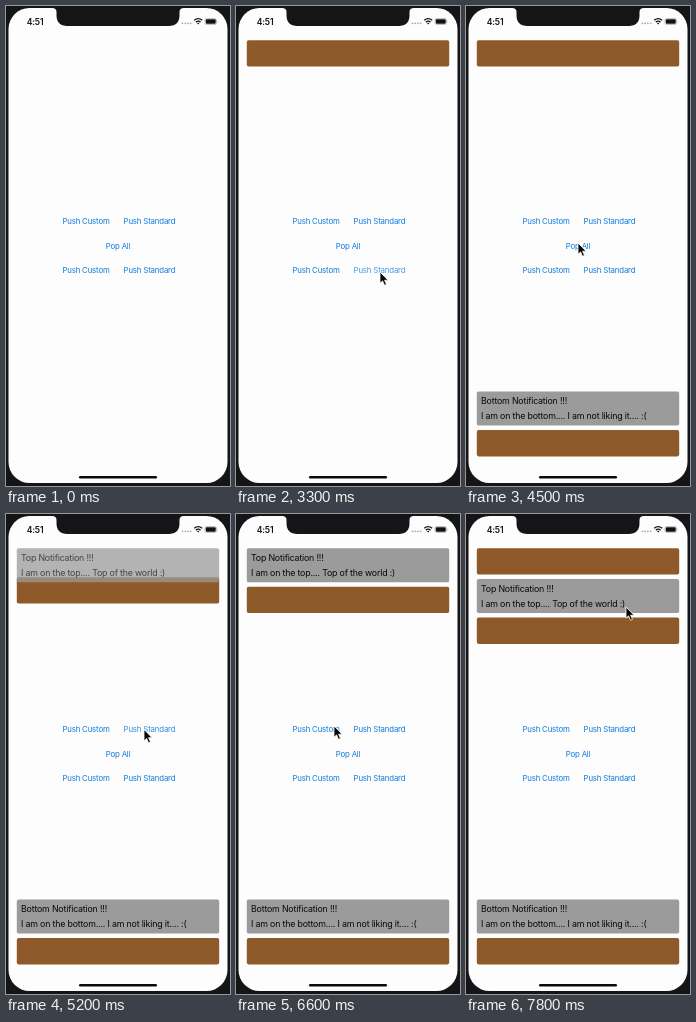
An HTML page for the animation above (8000 ms loop, 224 px wide and 480 px high).

```html
<!DOCTYPE html>
<html lang="en">
<head>
<meta charset="utf-8">
<title>Stacked notifications</title>
<style>
html, body { margin: 0; width: 100%; height: 100%; overflow: hidden; background: #151417; }
svg { display: block; width: 224px; height: 480px; }
text { font-family: Inter, "Liberation Sans", sans-serif; letter-spacing: -.02em; }
.link { font-size: 7.8px; fill: #0c7bdc; text-anchor: middle; }
.note { font-size: 8.8px; fill: #080808; }
</style>
</head>
<body>
<svg viewBox="0 0 224 480">
  <rect width="224" height="480" fill="#151417"/>
  <rect x="2.5" y="2" width="219" height="475" rx="21" fill="#fefdfe"/>
  <path d="M46 1V2Q50.500 2 50.500 6V9Q50.500 20 61.500 20H162.500Q173.500 20 173.500 9V6Q173.500 2 178 2V1Z" fill="#151417"/>
  <text x="20.700" y="18.500" font-size="8.600" font-weight="600" fill="#111">4:51</text>
  <g fill="#aaa">
    <circle cx="176.500" cy="17.300" r=".9"/><circle cx="179.200" cy="17.300" r=".9"/>
    <circle cx="181.900" cy="17.300" r=".9"/><circle cx="184.600" cy="17.300" r=".9"/>
  </g>
  <g fill="none" stroke="#111" stroke-width="1.400">
    <path d="M188.200 14.300Q192.200 11 196.200 14.300"/>
    <path d="M189.900 16.100Q192.200 14.200 194.500 16.100"/>
  </g>
  <path d="M191 17.200Q192.200 16.400 193.400 17.200L192.200 18.500Z" fill="#111"/>
  <rect x="199" y="12.500" width="11.500" height="6" rx="1.700" fill="none" stroke="#999" stroke-width=".6"/>
  <rect x="199.800" y="13.300" width="9.900" height="4.400" rx="1" fill="#111"/>
  <path d="M211.300 14.500Q212.400 15.500 211.300 16.500Z" fill="#999"/>
  <rect x="73" y="470" width="78" height="2.600" rx="1.300" fill="#0b0b0b"/>
  <g id="links"></g>
  <g id="notes"></g>
  <path id="cursor" d="M0 0V11.200L2.600 8.900L4.500 13.300L6.500 12.400L4.600 8.200H8.100Z" fill="#050505" stroke="#fff" stroke-width=".8" stroke-linejoin="round"/>
</svg>
<script>
const LOOP = 8000, STEP = 100, GAP = 4.5, TOP = 34.3, BOTTOM = 450.4, SLIDE = 400;
const $ = id => document.getElementById(id);
const clamp = v => Math.max(0, Math.min(1, v));
const ease = v => v * v * (3 - 2 * v);

function add(parent, tag, attrs, text) {
  const el = document.createElementNS("http://www.w3.org/2000/svg", tag);
  for (const k in attrs) el.setAttribute(k, attrs[k]);
  if (text) el.textContent = text;
  return parent.appendChild(el);
}

// label, centre x, baseline, [press, release] times
const links = [
  ["Push Custom", 80, 218.3, [[1600, 1720], [6730, 6850]]],
  ["Push Standard", 143.5, 218.3, [[4820, 4930]]],
  ["Pop All", 112, 242.7, []],
  ["Push Custom", 80, 267.2, [[3930, 4030]]],
  ["Push Standard", 143.5, 267.2, [[3275, 3400]]]
].map(([label, x, y, taps]) => ({
  taps, el: add($("links"), "text", { class: "link", x, y }, label)
}));

function makeNote(side, start, lines) {
  const h = lines ? 34 : 26.3;
  const el = add($("notes"), "g", {});
  add(el, "rect", { x: 10.8, width: 202.4, height: h, rx: 1.8, fill: lines ? "#9b9b9b" : "#8e5a29" });
  (lines || []).forEach((s, i) => add(el, "text", { class: "note", x: 15, y: 12.8 + 15 * i }, s));
  return { side, start, h, el };
}

const notes = [
  makeNote("top", 1700),
  makeNote("bottom", 3350, ["Bottom Notification !!!", "I am on the bottom.... I am not liking it.... :("]),
  makeNote("bottom", 4000),
  makeNote("top", 4930, ["Top Notification !!!", "I am on the top.... Top of the world :)"]),
  makeNote("top", 6850)
];

// time, x, y
const path = [
  [200, 217, 419], [500, 166, 319], [800, 104, 236], [1000, 91, 218], [1200, 90, 216.3],
  [2450, 90, 216.3], [2900, 124, 247], [3200, 144, 266], [3500, 144, 266], [3800, 86, 264],
  [4200, 86, 264], [4500, 112, 237], [4800, 138, 215.5], [5800, 138, 215.5],
  [6200, 116, 213], [6600, 98, 212], [7200, 98, 212], [7500, 132, 155], [7800, 160, 93]
];

function cursorAt(t) {
  const i = path.findIndex(p => p[0] > t);
  if (i < 0) return path[path.length - 1].slice(1);
  const [a, x, y] = path[i - 1], [b, u, v] = path[i];
  const k = (t - a) / (b - a);
  return [x + (u - x) * k, y + (v - y) * k];
}

function linkAlpha(taps, t) {
  return taps.reduce((alpha, [down, up]) => {
    const dim = clamp((t - down) / 80) * (1 - clamp((t - up) / 330));
    return Math.min(alpha, 1 - .78 * dim);
  }, 1);
}

function draw(t) {
  for (const l of links) l.el.setAttribute("opacity", linkAlpha(l.taps, t));

  // newest notes sit at the edge and push older ones inward
  const offset = { top: 0, bottom: 0 };
  for (const n of [...notes].reverse()) {
    const k = ease(clamp((t - n.start) / SLIDE));
    const y = n.side === "top" ? TOP + offset.top : BOTTOM - offset.bottom - n.h;
    n.el.setAttribute("transform", `translate(0 ${y})`);
    n.el.setAttribute("opacity", k);
    offset[n.side] += (n.h + GAP) * k;
  }

  const shown = t >= path[0][0];
  $("cursor").setAttribute("visibility", shown ? "visible" : "hidden");
  if (shown) $("cursor").setAttribute("transform", `translate(${cursorAt(t)})`);
}

function tick() {
  const t = performance.now() % LOOP;
  draw(Math.floor(t / STEP + .01) * STEP % LOOP);
  requestAnimationFrame(tick);
}
tick();
</script>
</body>
</html>
```
